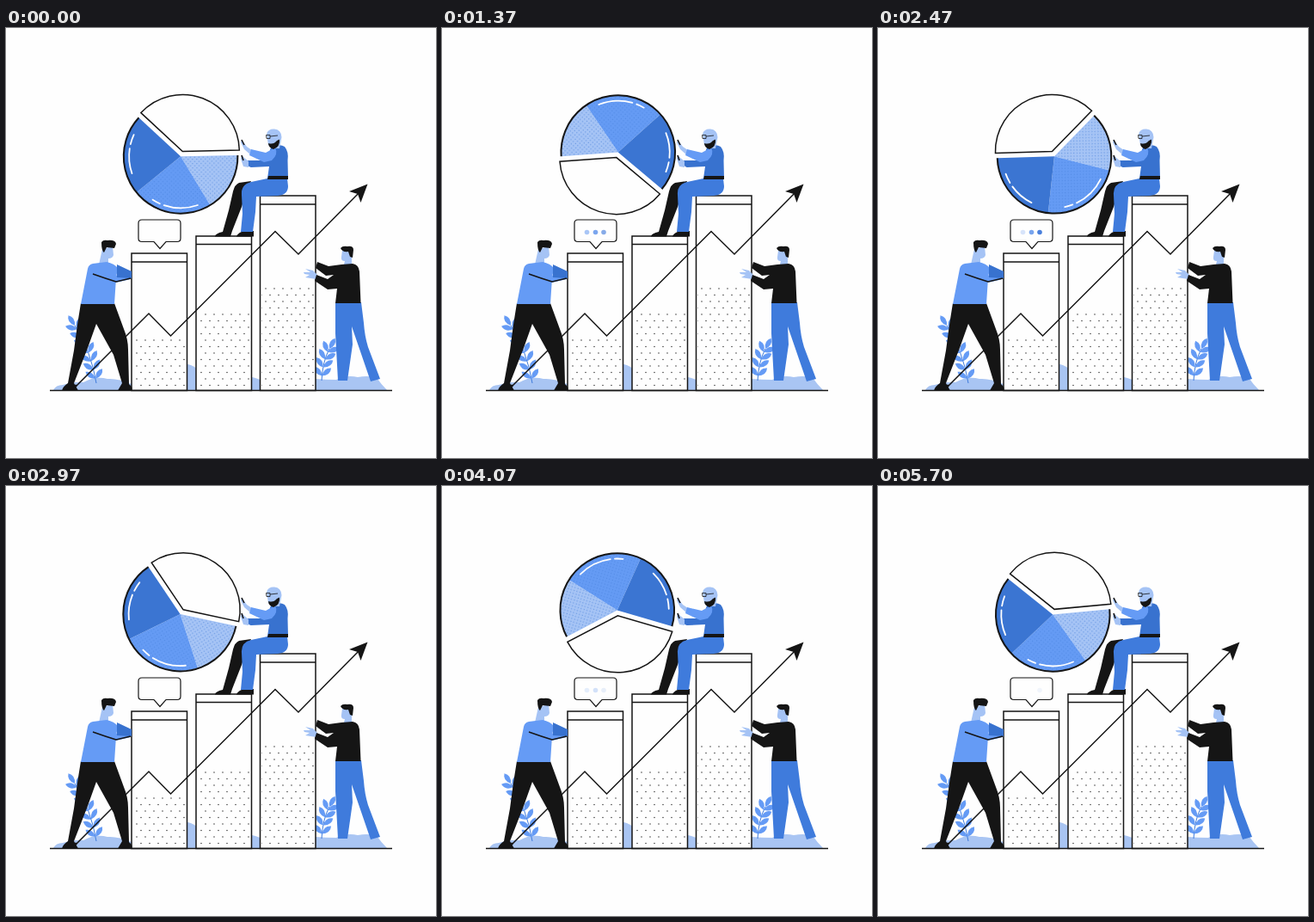
An HTML page that plays this animation: 500 by 500 pixels, repeating every 5730 ms.

```html
<!DOCTYPE html>
<html lang="en">
<head>
<meta charset="utf-8">
<title>Growth chart</title>
<style>
  html, body { margin: 0; width: 100%; height: 100%; overflow: hidden; background: #fefefe; }
  svg { display: block; width: 100vw; height: 100vh; }
  .ink { fill: #151515; }
  .line { fill: none; stroke: #151515; stroke-width: 1.5; stroke-linejoin: miter; }
  .box { fill: #fefefe; stroke: #151515; stroke-width: 1.5; }
  .skin { fill: #a5c3f5; }
  .mid { fill: #659bf5; }
  .blue { fill: #3f7bdc; }
  .deep { fill: #3872cf; }
  .haze { fill: #a9c5f3; }
  .shine { fill: none; stroke: #fff; stroke-width: 1.8; stroke-linecap: round; }
</style>
</head>
<body>
<svg viewBox="0 0 500 500">
  <defs>
    <pattern id="barDots" width="10" height="15" patternUnits="userSpaceOnUse">
      <circle cx="2" cy="3" r=".65" class="ink"/>
      <circle cx="7" cy="10.500" r=".65" class="ink"/>
    </pattern>
    <pattern id="pieDots" width="5" height="5" patternUnits="userSpaceOnUse">
      <circle cx="1.2" cy="1.2" r=".6" fill="#3f7ad6"/>
      <circle cx="3.7" cy="3.7" r=".6" fill="#3f7ad6"/>
    </pattern>
  </defs>

  <!-- ground haze and plants -->
  <path class="haze" d="M55 421Q58 415 66 415Q78 411 90 412Q104 404 118 408Q130 407 146 414V421Z"/>
  <path class="haze" d="M205 421V391Q214 390 222 396V421ZM280 421V405Q290 406 300 411V421Z"/>
  <path class="haze" d="M360 421V408Q372 409 384 409Q396 403 409 406Q424 403 432 408Q436 414 443 421Z"/>
  <g id="plants"></g>

  <!-- columns -->
  <g id="bars"></g>
  <path class="line" d="M51 421.5H449"/>

  <!-- speech bubble -->
  <path class="box" style="stroke-width:1.2" d="M158 223H199Q203 223 203 227V244.500Q203 248.500 199 248.500H186L179 256.500L172 248.500H158Q154 248.500 154 244.500V227Q154 223 158 223Z"/>
  <g id="typing"></g>

  <g id="pie"></g>

  <!-- man on the columns -->
  <g>
    <path class="ink" d="M285 178L271 180Q266 182 264 190L259 212L252 237Q243 239 243 242.500H261L263 236L274 208L279 192Z"/>
    <path class="ink" d="M273 236H288V242.500H268Q269 239 274 237Z"/>
    <path class="blue" d="M304 175L285 179Q273 182 274 194L275 216L273 237H287L290 214L291 196L316 195Q328 194 328 184L327 175Z"/>
    <path class="deep" d="M308 139Q318 134 324 138Q329 144 327.500 154L328 175H304L306 161L285 162Q280 161 281 154L303 154Z"/>
    <path class="skin" d="M282 155L276 150L274 148L273 152L276 161L282 162Z"/>
    <path class="skin" d="M286 142L280 138L274 130L273 133L277 141L284 147Z"/>
    <path class="mid" d="M285 141L302 145L313 139Q317 147 309 154L300 156L283 148Z"/>
    <path class="line" style="stroke-width:1.6" d="M274 130L277 136M274 148L276 154"/>
    <path class="ink" d="M305 172H328V176H304Z"/>
    <path class="skin" d="M303 123Q305 117 312 117.500Q320 118 320.500 127L318 140H312L305 136Z"/>
    <path class="ink" d="M305 134Q311 136 315 131L318 129.500Q319 138 311 141Q305 139 305 134Z"/>
    <path class="line" style="stroke-width:.8" d="M302.500 124.500H307V128.500H303ZM307 126L316 125"/>
  </g>

  <!-- man on the left -->
  <g>
    <path class="ink" d="M87 320H126L137 350Q142 362 142 374L143 414Q148 418 146 421.500H130L135 413L125 380L105 344L95 372L79 413L84 421.500H65Q66 417 72 413L79 375L83 345Z"/>
    <path class="skin" d="M112 257L124 254L125 264Q124 268 119 268L119 275L108 275Z"/>
    <path class="ink" d="M111 249Q113 246 118 247Q127 246 128 251L126 256L117 255L114 261Q111 259 111 249Z"/>
    <path class="mid" d="M101 274L117 272Q126 274 130 279L128 291L126 321H87L95 280Q96 275 101 274Z"/>
    <path class="mid" d="M102 283L130 288L145 286V292L128 296Q112 293 102 288Z"/>
    <path class="deep" d="M129 275L146 283V291L129 290Z"/>
    <path class="line" d="M101 286Q115 291 128 295L145 291"/>
  </g>

  <!-- trend arrow -->
  <path class="line" d="M80 418L166 332L191.500 358L313 236.500L340 263L412 190"/>
  <path class="ink" d="M420.500 181.500L399 190L409 193L412.500 203Z"/>
  <circle class="ink" cx="81" cy="416" r="1.500"/>

  <!-- man on the right -->
  <g>
    <path class="blue" d="M383 319H413L416 343Q417 358 421 371L435 408L424 411L412 376L402 347L403 368L397 410H386L383 355Z"/>
    <path class="skin" d="M362 287L357 282L348 280L354 284L346 284L347 286L353 287L348 290L354 291L361 292Z"/>
    <path class="skin" d="M391 259H402V275H393L394 271Q389 271 390 266Z"/>
    <path class="ink" d="M389 256Q391 253 397 254Q404 253 404 258L403 267L400 266L398 260Q391 261 389 256Z"/>
    <path class="ink" d="M390 275L403 274Q410 275 411 283L412.500 320H383L385 303L374 304L359 294L361 287L374 292L381 287L372 288L360 279L362 272L375 277Z"/>
  </g>
</svg>
<script>
const LOOP = 5730, FRAME = 30, TURNS = 2, STEPS = 172, CYCLE = LOOP / 6;
const $ = id => document.getElementById(id);
const rad = deg => deg * Math.PI / 180;
const polar = (r, deg) => `${(r * Math.cos(rad(deg))).toFixed(2)} ${(r * Math.sin(rad(deg))).toFixed(2)}`;
const arc = (r, a, b) => `M${polar(r, a)}A${r} ${r} 0 ${b - a > 180 ? 1 : 0} 1 ${polar(r, b)}`;
const wedge = (r, a, b) => arc(r, a, b) + 'L0 0Z';
const clamp = v => Math.max(0, Math.min(1, v));

// Columns: left, top, height of cap, top of dotted area
$('bars').innerHTML = [[146, 262, 10, 360], [221, 242, 9.5, 332], [295.5, 195, 10, 302]]
  .map(([x, y, cap, dots]) =>
    `<rect class="box" x="${x}" y="${y}" width="64.500" height="${421.5 - y}"/>
     <rect x="${x + 2}" y="${dots}" width="61" height="${418 - dots}" fill="url(#barDots)"/>
     <path class="line" d="M${x} ${y + cap}h64.500"/>`).join('');

// A curved stem from base through a control point to the tip, with paired leaves
function plant([x0, y0], [cx, cy], [x1, y1], pairs) {
  const bend = (a, b, c, k) => a * (1 - k) ** 2 + 2 * b * k * (1 - k) + c * k * k;
  const slope = (a, b, c, k) => (b - a) * (1 - k) + (c - b) * k;
  const leaf = (k, turn) => {
    const lean = Math.atan2(slope(x0, cx, x1, k), -slope(y0, cy, y1, k)) * 180 / Math.PI;
    return `<path class="mid" transform="translate(${bend(x0, cx, x1, k)} ${bend(y0, cy, y1, k)}) rotate(${lean + turn})" d="M0 0Q-6 -8 0 -14Q6 -8 0 0Z"/>`;
  };
  let out = `<path d="M${x0} ${y0}Q${cx} ${cy} ${x1} ${y1}" fill="none" stroke="#3f7bdc"/>` + leaf(1, 0);
  for (let i = 0; i < pairs; i++) {
    const k = (i + .5) / pairs;
    out += leaf(k, -45) + leaf(k, 45);
  }
  return out;
}
$('plants').innerHTML =
  plant([105, 413], [99, 376], [80, 346], 7) + plant([367, 410], [368, 388], [376, 373], 4);

// Pie at rest: white slice from -136 to 0 degrees, blue slices from 0 to 224
const slices = [[0, 60, '#a6c4f5', .75], [60, 142, '#659bf4', .65], [142, 224, '#3b75d2', 0]];
const shines = [[72, 110], [115, 124], [162, 190], [195, 206]];
const shift = d => `translate(${polar(d, -68)})`;
$('pie').innerHTML =
  `<g transform="${shift(-2.5)}">` +
  slices.map(([a, b, color, dotted]) => {
    const d = wedge(66, a, b);
    return `<path d="${d}" fill="${color}"/><path d="${d}" fill="url(#pieDots)" opacity="${dotted}"/>`;
  }).join('') +
  `<path class="line" style="stroke-width:2" d="${arc(66.3, 0, 224)}"/>` +
  shines.map(([a, b]) => `<path class="shine" d="${arc(60, a, b)}"/>`).join('') +
  `</g><path class="box" transform="${shift(3.8)}" d="${wedge(66, -136, 0)}"/>`;

// Typing dots: x, colour, fade in from/to, fade out from/to
const dots = [
  [168.5, '#a9c6f6', 170, 370, 420, 660],
  [178.5, '#78a4ee', 150, 400, 570, 800],
  [188, '#4a80dc', 190, 500, 690, 945]
];
$('typing').innerHTML = dots.map(([x, color]) => `<circle cx="${x}" cy="237.500" r="2.800" fill="${color}"/>`).join('');
const dotNodes = [...$('typing').children];

function draw(now) {
  const tick = Math.floor(now % LOOP / FRAME);
  const phase = tick * FRAME % CYCLE;

  // Each third of a turn eases slightly
  const sway = 1.8 - 3 * Math.cos(2 * Math.PI * phase / CYCLE);
  const turn = Math.round(tick * .9) * 360 * TURNS / STEPS + sway;
  $('pie').setAttribute('transform', `translate(204 147) rotate(${turn})`);

  dots.forEach(([, , a, b, c, d], i) => {
    const shown = Math.min(clamp((phase - a) / (b - a)), clamp((d - phase) / (d - c)));
    dotNodes[i].setAttribute('opacity', shown.toFixed(3));
  });
}

const start = performance.now();
function loop() {
  draw(performance.now() - start);
  requestAnimationFrame(loop);
}
loop();
</script>
</body>
</html>
```
